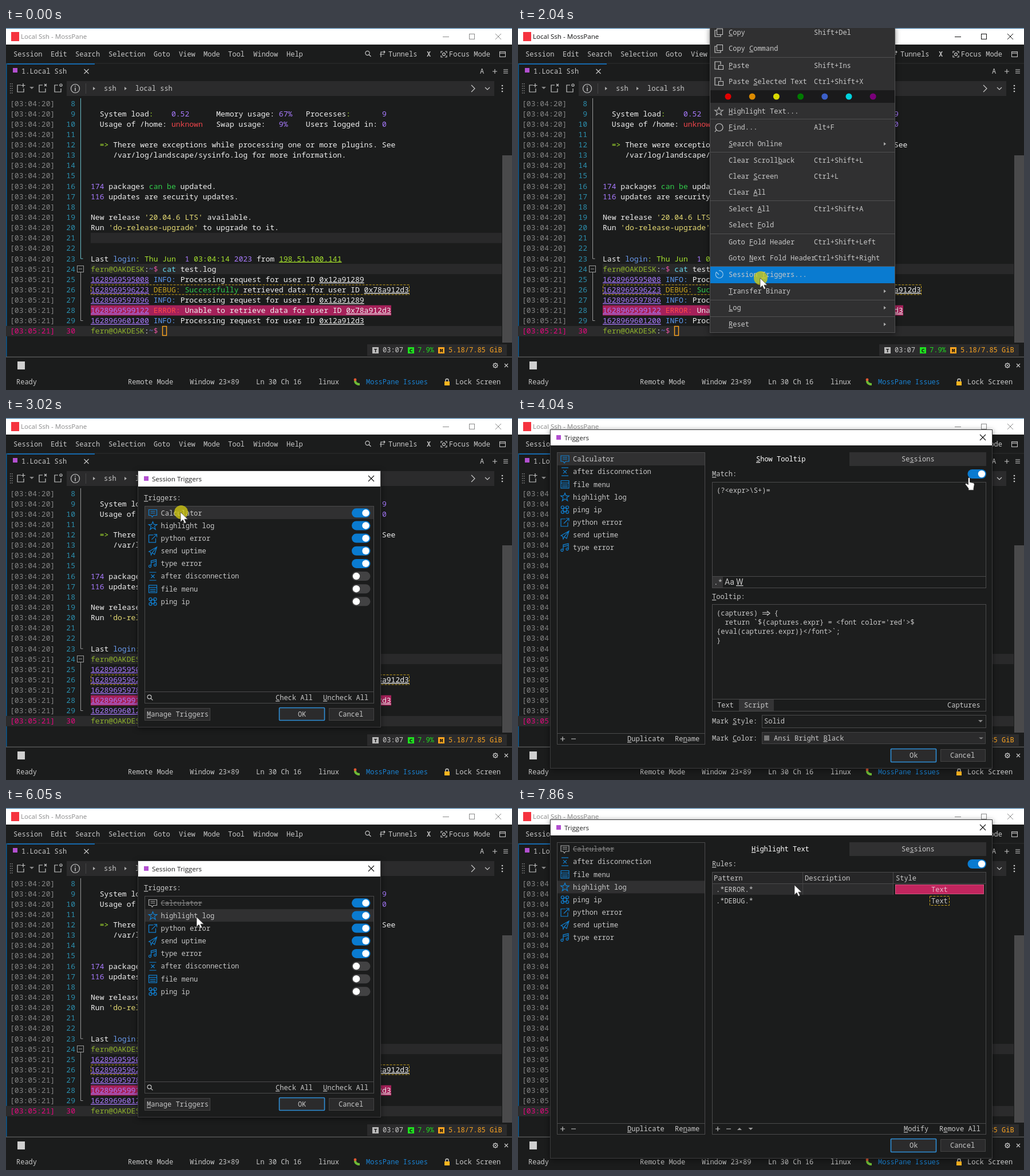
Write an HTML page that moves like this. It is 884x634 px and loops after 8000 ms.

```html
<!DOCTYPE html>
<html lang="en">
<head>
<meta charset="utf-8">
<title>Session triggers</title>
<style>
html, body { margin: 0; width: 100%; height: 100%; overflow: hidden; background: #1b1c1c; }
svg { display: block; width: 884px; height: 634px; }
text { white-space: pre; font-family: "Noto Sans Mono", "DejaVu Sans Mono", monospace; }
.ui { font-family: "Open Sans", "Noto Sans", sans-serif; }
.glyph { font-family: Roboto, sans-serif; }
.u { text-decoration: underline; text-decoration-thickness: 1px; }
.icon { fill: none; stroke: #1180d2; stroke-width: 1.2; }
.field { fill: #1d1e1e; }
.off .field { fill: #313132; }
.off .calc text { fill: #858585; text-decoration: line-through; }
.off.edit .calc text { fill: #c8c8c8; }
.off .calc .icon { stroke: #aaa; }
.off .dims text { fill: #5c5c5c; }
.when-off, .off .when-on { display: none; }
.off .when-off { display: inline; }
.window { filter: drop-shadow(0 2px 5px rgba(0, 0, 0, .5)); }
</style>
</head>
<body>
<svg id="stage" viewBox="0 0 884 634"></svg>
<script>
const stage = document.getElementById('stage');
const BG = '#1b1c1c', PANEL = '#2b2b2c', EDGE = '#4b4b4c';
const GREY = '#c8c8c8', BLUE = '#0a7bd0', PURPLE = '#b24fd0';

// Drawing helpers; "_" in a label marks the access key.
const esc = s => s.replace(/</g, '&lt;').replace(/_(.)/g, '<tspan class="u">$1</tspan>');
const text = (x, y, s, fill = GREY, size = 12, attrs = '') =>
  `<text x="${x}" y="${y + size * .35}" fill="${fill}" font-size="${size}" ${attrs}>${esc(s)}</text>`;
const title = (x, y, s, fill) => text(x, y, s, fill, 11.6, 'class="ui"');
const rect = (x, y, w, h, fill, attrs = '') =>
  `<rect x="${x}" y="${y}" width="${w}" height="${h}" fill="${fill}" ${attrs}/>`;
const box = (x, y, w, h, fill = 'none', stroke = EDGE, attrs = '') =>
  rect(x + .5, y + .5, w - 1, h - 1, fill, `stroke="${stroke}" ${attrs}`);
const field = (x, y, w, h) => box(x, y, w, h, BG, EDGE, 'class="field"');
const path = (d, stroke = GREY, w = 1.2, fill = 'none') =>
  `<path d="${d}" fill="${fill}" stroke="${stroke}" stroke-width="${w}"/>`;
const dot = (x, y, r, fill, stroke = 'none') =>
  `<circle cx="${x}" cy="${y}" r="${r}" fill="${fill}" stroke="${stroke}" stroke-width="1.2"/>`;
const cross = (x, y, r, c, w = 1.2) => path(`M${x - r} ${y - r}l${2 * r} ${2 * r}m0 ${-2 * r}l${-2 * r} ${2 * r}`, c, w);
const right = (x, y, c = '#aaa') => path(`M${x} ${y - 3}v6l4 -3z`, 'none', 0, c);
const down = (x, y, c = '#888', s = 1) => path(`M${x - 4} ${y - 2 * s}h8l-4 ${4 * s}z`, 'none', 0, c);
const lens = (x, y, r) => dot(x, y, r, 'none', GREY) + path(`M${x + r * .7} ${y + r * .7}l3.5 3.5`);
const group = (id, body, attrs = '') => `<g id="${id}" ${attrs}>${body}</g>`;
const button = (x, y, w, h, s, tx, main) =>
  (main ? box(x, y, w, h, PANEL, '#2f8fd8', 'stroke-width="1.6" rx="1"') : box(x, y, w, h, PANEL, '#444')) +
  text(tx, y + h / 2, s);
const toggle = (x, y, on, cls = '') =>
  `<g class="${cls}">${rect(x, y - 8, 32.5, 16, on ? BLUE : '#424243', 'rx="8"')}${dot(x + (on ? 24.5 : 8), y, 6.2, '#fff')}</g>`;

const icons = {
  tip: 'M-7 -6h14v10h-6l-2 3-2-3h-4zM-4 -3h8M-4 0h8',
  star: 'M0 -7l2 5h5.2l-4.2 3.2 1.7 5.3-4.7-3.2-4.7 3.2 1.7-5.3-4.2-3.2h5.2z',
  out: 'M1 -6h-8v13h12v-7M-2 2l8-8M2 -7h5v5',
  send: 'M-7 1l14-8-4 13-4-3-2 4-1-5zM-1 3l8-10',
  note: 'M-3 4v-9l9-2v9M-3 -2l9-2',
  bar: 'M-6 -7h12M-6 7h12M-3 -3l6 6M3 -3l-6 6',
  list: 'M-7 -6.500h14v13h-14zM-7 -2.500h14M-5 1h10M-5 4h10',
  knot: 'M-3 -3h6v6h-6z'
};
function icon(name, x, y) {
  let extra = '';
  const ring = (cx, cy, r) => `<circle cx="${cx}" cy="${cy}" r="${r}"/>`;
  if (name === 'note') extra = ring(-5, 4.5, 2) + ring(4, 2.5, 2);
  if (name === 'knot') for (const a of [-1, 1]) extra += ring(a * 4, -4, 2.6) + ring(a * 4, 4, 2.6);
  return `<g class="icon" transform="translate(${x} ${y})"><path d="${icons[name]}"/>${extra}</g>`;
}
const triggers = {
  'Calculator': 'tip', 'highlight log': 'star', 'python error': 'out', 'send uptime': 'send',
  'type error': 'note', 'after disconnection': 'bar', 'file menu': 'list', 'ping ip': 'knot'
};
const PITCH = 22.15;
const entries = (names, x, y) => names.map((n, i) => `<g class="${i ? '' : 'calc'}">` +
  icon(triggers[n], x, y + i * PITCH) + text(x + 14, y + i * PITCH, n) + '</g>').join('');

// Terminal lines: each piece is "text" or [text, colour, underlined].
const rowY = n => 132 + (n - 8) * 18.13;
const V = '#a97bff', G = '#32cd4b', L = '#a6e22e', Y = '#e6db74', C = '#66d9ef', R = '#f0454b', P = '#8fb32d';
const row = (n, ...parts) => `<text x="148" y="${rowY(n) + 4.6}" font-size="13.06" fill="#f0f0f0">` +
  parts.map(p => typeof p === 'string' ? esc(p)
    : `<tspan fill="${p[1]}" class="${p[2] ? 'u' : ''}">${esc(p[0])}</tspan>`).join('') + '</text>';
const prompt = [['fern@OAKDESK', P], ':', ['~', '#6a6fd0'], ['$ ', '#e0529c']];
const log = (n, time, level, color, ok, rest, id) => row(n, [time, V, 1], ' ', [level, color], [': ', color],
  [ok, G], rest + ' for user ID ', [id, '#f0f0f0', 1]);

function terminal() {
  let s = rect(148, rowY(24) - 9, 718, 18, '#29292a') + rect(0, rowY(30) - 9, 866, 18, PANEL);
  s += group('hoverRow', rect(148, rowY(21) - 9, 718, 18, '#29292a'));
  for (let n = 8; n <= 30; n++) {
    const last = n === 30;
    s += text(7, rowY(n), n < 24 ? '[03:04:20]' : '[03:05:21]', last ? '#e5097f' : '#858585', 13.06);
    s += text(121, rowY(n), String(n), last ? '#e5097f' : '#2c8fae', 13.06, 'text-anchor="end"');
  }
  s += '<path id="fold" d="M130.500 123v281h4" fill="none"/>' + box(124, 416, 12, 12, BG, '#999') +
    path('M127 422h6M130.500 428v84.500h4', '#999', 1);
  s += rect(148, rowY(28) - 9, 525, 18, '#a5215a') +
    box(148, rowY(26) - 9, 557, 18, 'none', '#c8a21c', 'stroke-dasharray="4 2"');
  s += row(9, '  System load', [':', L], '    ', ['0.52', V], '      Memory usage: ', ['67%', V], '   Processes', [':', L], '       ', ['9', V]);
  s += row(10, '  Usage of /home: ', ['unknown', R], '   Swap usage:   ', ['9%', V], '    Users logged in: ', ['0', V]);
  s += row(12, ['  => ', L], 'There were exceptions while processing one or more plugins. See');
  s += row(13, '     /var/log/landscape/sysinfo.log for more information.');
  s += row(16, ['174', V], ' packages ', ['can be', G], ' updated.');
  s += row(17, ['116', V], ' updates are security updates.');
  s += row(19, 'New release ', ["'20.04.6 LTS'", Y], ' available.');
  s += row(20, 'Run ', ["'do-release-upgrade'", Y], ' to upgrade to it.');
  s += row(23, 'Last ', ['login', '#6a9bf0'], [': Thu Jun  ', L], ['1', V], [' 03:04:14 ', L], ['2023', V], ' from ', ['198.51.100.141', L, 1]);
  s += row(24, ...prompt, ['cat', C], ' test.log');
  const ask = 'Processing request';
  s += log(25, '1628969595008', 'INFO', '#5f9cf5', '', ask, '0x12a91289');
  s += log(26, '1628969596223', 'DEBUG', '#c8a21c', 'Successfully', ' retrieved data', '0x78a912d3');
  s += log(27, '1628969597896', 'INFO', '#5f9cf5', '', ask, '0x12a91289');
  s += log(28, '1628969599122', 'ERROR', '#ff4a4a', '', 'Unable to retrieve data', '0x78a912d3');
  s += log(29, '1628969601200', 'INFO', '#5f9cf5', '', ask, '0x12a912d3');
  return s + row(30, ...prompt) + box(273, 522, 8, 17, 'none', '#ffa51f', 'stroke-width="1.4"');
}

function frame() {
  let s = rect(0, 0, 884, 634, BG) + rect(0, 0, 884, 29, '#fff') + rect(0, 0, 884, 1, '#1d5f94');
  s += rect(9, 7, 14, 16, '#f5333f');
  s += group('caption', '<g fill="currentColor">' + title(26, 15, 'Local Ssh - MossPane', 'currentColor') + '</g>' +
    path('M763 15.500h11', 'currentColor', 1) + box(809, 10, 10, 10, 'none', 'currentColor') + cross(860, 15, 5, 'currentColor', 1));
  const menus = { Session: 13, Edit: 78, Search: 121, Selection: 179, Goto: 258, View: 302, Mode: 345, Tool: 388, Window: 432, Help: 490 };
  for (const m in menus) s += text(menus[m], 46, m);
  s += lens(631.5, 44, 3.6) + path('M655 51v-9h7M653 46h8M660 40l2 2-2 2') + text(668, 46, 'Tunnels') +
    text(735, 46, 'X', GREY, 12, 'font-weight="700"') +
    path('M760 44v-3h3M767 41h3v3M770 48v3h-3M763 51h-3v-3') + dot(765, 46, 2.4, 'none', GREY) +
    text(774, 46, 'Focus Mode') + box(862, 41, 11, 10, 'none', GREY) + path('M862 44h11');
  s += rect(0, 61.5, 884, 1, '#2e2e2f') + rect(2, 62, 153, 2, '#1467ab') + rect(0, 62, 1.5, 514, '#0e5c95');
  s += rect(12, 70, 8, 8, PURPLE) + text(27, 76, '1.Local Ssh') + cross(140.5, 76, 4, GREY) +
    text(828, 76, 'A') + path('M850 76h8M854 72v8M869 73h8M869 76h8M869 79h8', GREY, 1.1);
  s += rect(106, 93, 747, 26, PANEL);
  for (let i = 0; i < 10; i++) s += rect(7 + i % 2 * 3, 97 + (i >> 1) * 4, 1.5, 1.5, '#888');
  for (const x of [26, 64, 91]) s += path(`M${x} 100h-6v12h11v-6`);
  s += path('M30 97v7M26.500 100.500h7') + down(45, 105) + cross(69, 100, 2, GREY) + dot(96, 100, 2, 'none', GREY) +
    dot(121, 106, 7.5, 'none', GREY) + path('M121 104.500v6M121 101v1.500', GREY, 1.5) + rect(139, 97, 1, 18, '#454546') +
    right(152, 106) + text(171, 106, 'ssh') + right(207, 106) + text(226, 106, 'local ssh') +
    path('M813 100l6 6-6 6M837 104l4 4 4-4');
  for (const y of [101, 106, 111]) s += dot(867, y, 1.3, GREY);
  s += rect(867, 223, 17, 328, '#4a4a4b') + terminal();
  s += rect(631, 554, 244, 20, PANEL);
  const badge = (x, c, k, value, vx, vc) => rect(x, 559, 11, 11, c) + text(x + 2.7, 564.5, k, '#111', 9.5, 'font-weight="700"') + text(vx, 564, value, vc);
  s += badge(640, '#bbb', 'T', '03:07', 658, GREY) + badge(702, '#1fe01f', 'C', '7.9%', 719, '#1fe01f') +
    badge(755, '#ffa51f', 'M', '5.18/7.85 GiB', 773, '#ffa51f');
  s += rect(0, 575.5, 884, 1.5, '#555') + rect(20, 584, 13, 14, '#cfcfcf') +
    dot(855, 591, 3.4, 'none', GREY) + dot(855, 591, 1.2, GREY) +
    path('M855 586v2M855 594v2M850 591h2M858 591h2M851.500 587.500l1.500 1.500M857 593l1.500 1.500M858.500 587.500l-1.500 1.500M853 593l-1.500 1.500') +
    cross(874, 591, 3, GREY);
  const status = { 'Ready': 18, 'Remote Mode': 213, 'Window 23×89': 321, 'Ln 30 Ch 16': 437, 'linux': 546, 'Lock Screen': 785 };
  for (const k in status) s += text(status[k], 620, k);
  s += text(629, 620, 'MossPane Issues', '#1a82d2') + path('M610 615v4q1 5 8 5', '#6dbb35', 4) + dot(610, 616, 2.4, '#e05a33');
  return s + path('M768 620v-3a2.500 2.500 0 0 1 5 0v3', '#ccc', 1.4) + rect(766, 619, 9, 7, '#ffb51f');
}

const menuItems = [
  [8, '_Copy', 'Shift+Del'], [36, 'Copy _Command'], [66, '_Paste', 'Shift+Ins'], [94, 'Paste _Selected Text', 'Ctrl+Shift+X'],
  [146, '_Highlight Text...'], [174, '_Find...', 'Alt+F'], [203, '_Search Online', '>'], [232, 'Clear Scroll_back', 'Ctrl+Shift+L'],
  [260, 'Clear _Screen', 'Ctrl+L'], [288, 'Clear _All'], [317, 'Select _All', 'Ctrl+Shift+A'], [345, 'Select _Fold'],
  [375, 'Goto _Fold Header', 'Ctrl+Shift+Left'], [403, 'Goto _Next Fold Header', 'Ctrl+Shift+Right'],
  [432, 'Session _Triggers...'], [461, '_Transfer Binary', '>'], [490, '_Log', '>'], [519, '_Reset', '>']
];
function menu() {
  let s = box(335, -2, 324, 536, '#303031', '#505051') + rect(336, 109, 322, 22, '#1a1a1b');
  s += rect(336, 0, 322, 29, BLUE, 'id="menuHover"');
  for (const y of [51, 159, 217, 302, 360, 417, 476, 505]) s += rect(336, y, 322, 1, '#505051');
  ['#e00000', '#dc8b00', '#d9d900', '#007a00', '#3b5fc8', '#00d2de', '#7a007a'].forEach((c, i) => s += dot(367 + i * 42.2, 120, 5.5, c));
  for (const [y, label, key] of menuItems) {
    s += text(368, y, label);
    if (key) s += key === '>' ? right(639, y) : text(517, y, key);
  }
  for (const y of [8, 36]) s += box(347, y - 7, 11, 11, 'none', GREY) + path(`M347 ${y - 4}h-3v11h10v-3`);
  for (const y of [66, 94]) s += path(`M350 ${y + 6}h-6v-13h10v5`) + box(350, y - 1, 9, 8, 'none', GREY);
  s += '<g style="filter:grayscale(1) brightness(1.6)">' + icon('star', 351, 146) + '</g>';
  return s + dot(351.5, 174, 6.5, 'none', GREY) + path('M347 178l-3 4') +
    path('M347 427a6.500 6.500 0 1 0 4 -2M351 432l-4-4', '#9cc8e8');
}

const win = (x, y, w, h, name, cx) => box(x, y, w, h, BG, '#3c3c3d') + rect(x + 1, y + 1, w - 2, 27, '#fff') +
  rect(x + 11, y + 10, 8, 8, PURPLE) + title(x + 25, y + 15, name, '#222') + cross(cx, y + 14, 5, '#111', 1.1);

function pick() {
  let s = win(230, 92, 425, 450, 'Session Triggers', 638) + text(241, 140, '_Triggers:') + box(242, 154, 401, 346);
  s += rect(243, 0, 399, 22, '#303031', 'id="pickRow"') + entries(Object.keys(triggers), 256.5, 166.5);
  for (let i = 0; i < 8; i++) s += toggle(604, 166.3 + i * PITCH, i < 5);
  return s + rect(242, 479, 401, 1, EDGE) + lens(250.5, 488.5, 3.4) + text(471, 490, '_Check All') + text(554, 490, '_Uncheck All') +
    button(242, 508, 115, 22, '_Manage Triggers', 246) + button(477, 507, 80, 23, 'OK', 510, true) + button(564, 508, 79, 22, 'Cancel', 581);
}

function manager() {
  return win(56, 20, 773, 594, 'Triggers', 812) + box(68, 60, 259, 512) + rect(69, 0, 257, 22, '#303031', 'id="listRow"') +
    entries(['Calculator', ...Object.keys(triggers).slice(1).sort()], 82, 72) + rect(68, 552, 258, 1, EDGE) +
    path('M74 562h8M78 558v8M93 562h8') + text(191, 562, '_Duplicate') + text(274, 562, 'Re_name') +
    rect(579, 60, 239, 24, '#303031') + text(670, 72, 'Se_ssions') +
    button(651, 579, 80, 24, 'Ok', 684, true) + button(738, 580, 79, 22, 'Cancel', 755);
}

function editPage() {
  let s = text(416, 72, '_Show Tooltip', '#fff') + text(339, 98, '_Match:') + toggle(785.5, 98, true, 'when-on') + toggle(785.5, 98, false, 'when-off');
  s += box(339, 112, 479, 186) + field(339, 112, 479, 166) + rect(340, 278, 18, 19, '#343435') + text(347, 127, '(?<expr>\\S+)=');
  s += text(342, 288, '.*', GREY, 12.5) + text(361, 287, 'Aa', GREY, 14, 'class="glyph"') + text(381, 287, '_W', GREY, 14, 'class="glyph"');
  s += text(339, 313, '_Tooltip:') + box(339, 326, 479, 188) + field(339, 326, 479, 167);
  s += text(347, 342, '(captures)    {') + path('M427 340.500h10M427 343.500h10M435 338l5 4-5 4');
  ["  return `${captures.expr} = <font color='red'>$", '{eval(captures.expr)}</font>`;', '}']
    .forEach((line, i) => s += text(347, 358 + i * 16, line));
  s += rect(386, 493, 61, 20, '#343435') + '<g class="dims">' + text(348, 503, 'Text') + text(395, 503, 'Script') + text(750, 503, 'Captures') + '</g>';
  s += text(339, 531, 'Mark _Style:') + field(426, 520, 392, 23) + text(430, 531, 'Solid') + down(808, 531);
  s += text(339, 561, 'Mark _Color:') + box(426, 550, 391, 21, PANEL, '#444') + rect(430, 556, 9, 9, '#767676');
  return s + '<g class="dims">' + text(447, 561, 'Ansi Bright _Black') + '</g>' + down(809, 561, '#888', .7);
}

function rulesPage() {
  let s = text(408, 72, '_Highlight Text', '#fff') + text(339, 98, '_Rules:') + toggle(785.5, 98, true);
  s += box(339, 112, 479, 460) + rect(340, 113, 477, 19, '#262627') + rect(340, 132, 477, 1, EDGE) + rect(340, 133, 316, 19, '#2d2d2e');
  for (const x of [497, 655]) s += rect(x, 113, 1, 39, x > 600 ? EDGE : '#434344');
  s += text(342, 123, 'Pattern') + text(501, 123, 'Description') + text(660, 123, 'Style');
  s += text(346, 142.5, '.*ERROR.*') + box(659, 134, 155, 17, '#c2255e', '#d2557f') + text(722, 142.5, 'Text', '#e8b8cc');
  s += text(346, 162.5, '.*DEBUG.*') + box(719, 154, 35, 17, 'none', '#c8a21c', 'stroke-dasharray="4 2"') + text(722, 162.5, 'Text');
  s += rect(339, 552, 478, 1, EDGE) + path('M345 562h8M349 558v8M364 562h8') + path('M383 564h8l-4-4z', 'none', 0, '#999') + down(406.5, 562, '#999');
  return s + text(674, 562, '_Modify') + text(736, 562, 'R_emove All');
}

stage.innerHTML = frame() + group('menu', menu(), 'class="window"') + group('pick', pick(), 'class="window"') +
  group('manager', manager() + group('edit', editPage()) + group('rules', rulesPage()), 'class="window"') +
  group('pointer', '<circle id="press" r="12" cx="1" fill="#d8cf12" opacity=".75"/>' +
    group('arrow', path('M0 0v17l4-3.800 2.800 6.300 2.800-1.200-2.800-6.100h5.700z', '#333', .7, '#fff')) +
    group('hand', path('M-1.500 1.500q1.500-2.500 3 0v7l6 1.300q2 .7 1.700 3l-1.200 6.500v3h-9v-3l-5.500-7q0-2.500 2.500-1.500l2.500 2z', '#333', .8, '#fff')));

// time, scene, pointer x, y, pointer kind (p: pressed, h: hand)
const steps = [
  [0, 'term', -60, -60, ''], [200, 'term', 478, 558, ''], [400, 'term', 400, 538, ''], [600, 'term', 333, 520, ''],
  [1000, 'term', 335, 531, 'p'], [1200, 'menu', 335, 531, ''], [1400, 'menu', 352, 500, ''], [1620, 'menu', 385, 470, ''],
  [1840, 'menu', 423, 438, ''], [2040, 'menu', 423, 438, 'p'], [2210, 'term', 423, 438, ''], [2410, 'pick', 423, 438, ''],
  [2620, 'pick', 370, 300, ''], [2820, 'pick', 305, 165, ''], [3020, 'pick', 305, 165, 'p'], [3240, 'edit', 305, 165, ''],
  [3560, 'edit', 420, 150, ''], [3720, 'edit', 610, 122, ''], [3880, 'edit', 740, 108, ''], [4040, 'edit', 788, 104, 'h'],
  [4280, 'edit', 788, 104, 'hp'], [4460, 'edit', 788, 104, 'h'], [4660, 'edit', 770, 220, ''], [4860, 'edit', 715, 430, ''],
  [5060, 'edit', 678, 565, ''], [5260, 'edit', 672, 588, ''], [5470, 'edit', 672, 588, 'p'], [5690, 'pick', 600, 480, ''],
  [5860, 'pick', 430, 320, ''], [6050, 'pick', 333, 191, ''], [6270, 'pick', 333, 191, 'p'], [6480, 'pick', 333, 191, ''],
  [6690, 'pick', 333, 191, 'p'], [6890, 'pick', 333, 191, ''], [7070, 'edit', 333, 191, ''], [7290, 'edit', 160, 138, ''],
  [7590, 'rules', 160, 138, 'p'], [7725, 'rules', 330, 140, ''], [7860, 'rules', 483, 135, '']
];
const el = id => document.getElementById(id);
const show = (id, on) => { el(id).style.display = on ? 'inline' : 'none'; };
let shown;

function draw(step) {
  const [t, scene, x, y, kind] = step;
  const active = t >= 1000 && t < 2410;
  stage.setAttribute('class', scene + (t >= 4280 ? ' off' : ''));
  el('caption').style.color = active ? '#111' : '#8a8a8a';
  el('fold').setAttribute('stroke', t < 1000 ? '#6cc0cc' : '#999');
  show('hoverRow', t < 1000);
  show('menu', scene === 'menu');
  show('pick', scene === 'pick');
  show('manager', scene === 'edit' || scene === 'rules');
  show('edit', scene === 'edit');
  show('rules', scene === 'rules');
  const item = menuItems.find(m => Math.abs(m[0] - y) <= 14);
  show('menuHover', item && y < 525);
  if (item) el('menuHover').setAttribute('y', item[0] - 14);
  const hover = Math.floor((y - 155) / PITCH);
  el('pickRow').setAttribute('y', 155 + (hover < 8 ? hover : 0) * PITCH);
  el('listRow').setAttribute('y', 61 + (scene === 'rules' ? 3 : 0) * PITCH);
  el('pointer').setAttribute('transform', `translate(${x} ${y})`);
  show('press', kind.includes('p'));
  show('hand', kind.includes('h'));
  show('arrow', !kind.includes('h'));
}
function tick() {
  const t = performance.now() % 8000;
  const step = steps.findLast(s => s[0] <= t);
  if (step !== shown) draw(shown = step);
  requestAnimationFrame(tick);
}
tick();
</script>
</body>
</html>
```
